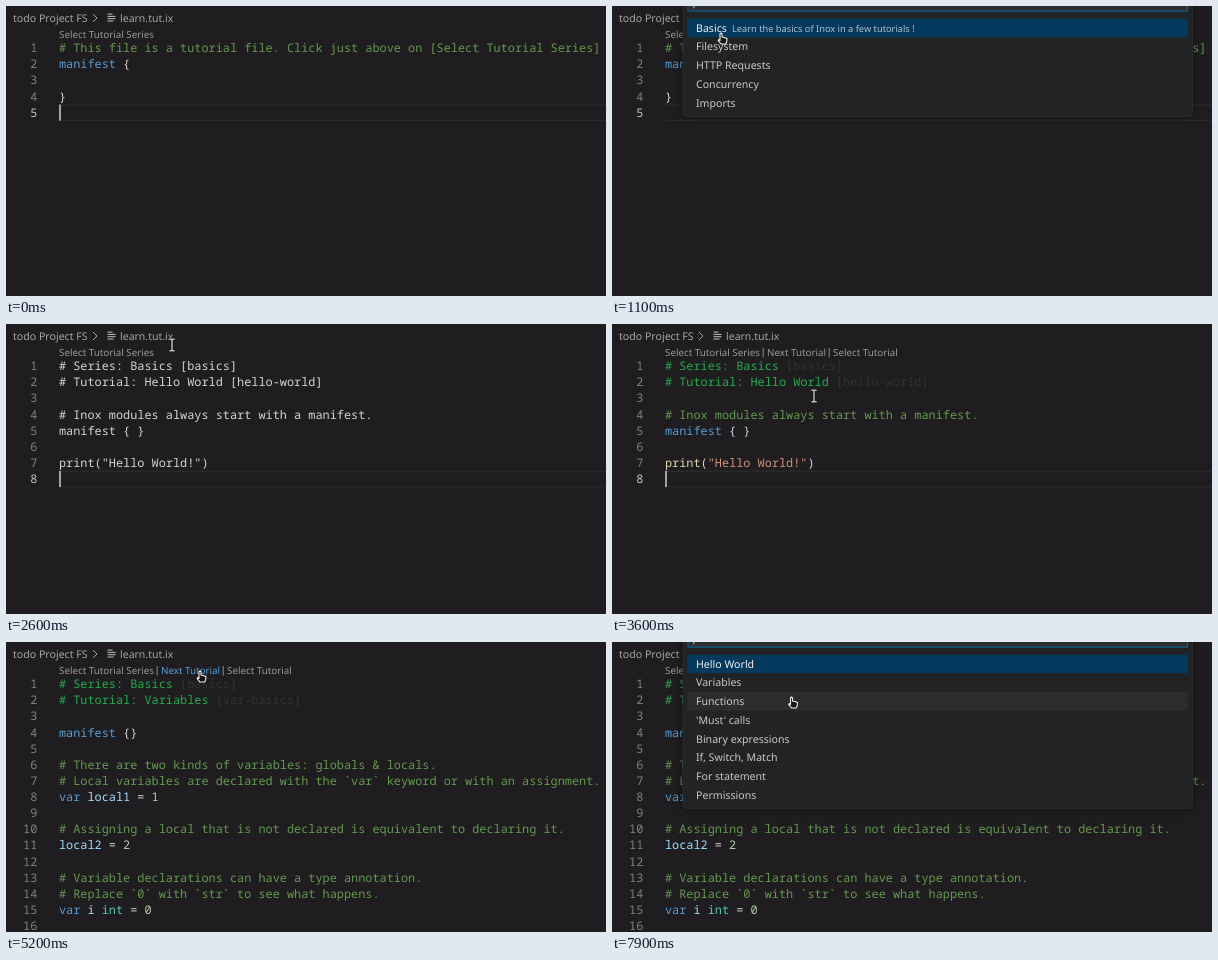
Recreate the animation shown at these times as an HTML page with a canvas. Size 600 px wide and 290 px high, loop 8 s.

```html
<!DOCTYPE html>
<html lang="en">
<head>
<meta charset="utf-8">
<title>Tutorial editor</title>
<style>
html, body { margin: 0; width: 100%; height: 100%; overflow: hidden; background: #1f1d1f; }
canvas { display: block; width: 600px; height: 290px; }
</style>
</head>
<body>
<canvas id="stage"></canvas>
<script>
const LOOP = 8000, STEP = 100;
const LEFT = 53, TOP = 34, LINE = 16.13, ROW = 18.7, ROWS_TOP = 12.6;
const CODE = "11.88px 'Noto Sans Mono', monospace";
const ui = size => `${size}px 'Noto Sans', sans-serif`;

const COLORS = {
  plain: '#d4d4d4', comment: '#629a4c', heading: '#1fae4c', faint: '#333234',
  keyword: '#569cd6', name: '#9cdcfe', type: '#4ec9b0', call: '#dcdcaa',
  string: '#ce9178', number: '#b5cea8'
};

const INTRO = [
  '# This file is a tutorial file. Click just above on [Select Tutorial Series]',
  'manifest {', '', '}', ''
];
const HELLO = [
  '# Series: Basics [basics]', '# Tutorial: Hello World [hello-world]', '',
  '# Inox modules always start with a manifest.', 'manifest { }', '',
  'print("Hello World!")', ''
];
const VARIABLES = [
  '# Series: Basics [basics]', '# Tutorial: Variables [var-basics]', '',
  'manifest {}', '',
  '# There are two kinds of variables: globals & locals.',
  '# Local variables are declared with the `var` keyword or with an assignment.',
  'var local1 = 1', '',
  '# Assigning a local that is not declared is equivalent to declaring it.',
  'local2 = 2', '',
  '# Variable declarations can have a type annotation.',
  '# Replace `0` with `str` to see what happens.',
  'var i int = 0', ''
];

// Highlighting arrives in passes: 0 plain, 1 grammar, 2 semantic.
const SCENES = [
  { from: 0, lines: INTRO, passes: [0, 0], active: 5 },
  { from: 2600, lines: HELLO, passes: [2700, 3000], active: 8 },
  { from: 4600, lines: VARIABLES, passes: [4700, 4900], active: 0 }
];

const PICKERS = [
  { from: 1000, to: 2500, blinkFrom: 1000, note: 'Learn the basics of Inox in a few tutorials !',
    items: ['Basics', 'Filesystem', 'HTTP Requests', 'Concurrency', 'Imports'] },
  { from: 6700, to: LOOP, blinkFrom: 6600,
    items: ['Hello World', 'Variables', 'Functions', "'Must' calls", 'Binary expressions',
      'If, Switch, Match', 'For statement', 'Permissions'] }
];

const LENSES = [
  { text: 'Select Tutorial Series', x: 53, end: 148 },
  { text: 'Next Tutorial', x: 155, end: 214 },
  { text: 'Select Tutorial', x: 221, end: 286 }
];

// time, x, y of the pointer's hot spot
const POINTER = [
  [100, 300, 220], [900, 109, 27], [1600, 109, 27], [2100, 178, 22], [2300, 179, 21],
  [2600, 166, 21], [3200, 205, 84], [3600, 202, 72], [4200, 202, 56], [4400, 194, 29],
  [5200, 194, 29], [5800, 255, 140], [6500, 253, 28], [7200, 253, 28], [7700, 179.5, 55]
];

const canvas = document.getElementById('stage');
const ctx = canvas.getContext('2d');
const ratio = window.devicePixelRatio || 1;
canvas.width = 600 * ratio;
canvas.height = 290 * ratio;
ctx.scale(ratio, ratio);
ctx.textRendering = 'geometricPrecision';

function text(str, x, y, color, font, align = 'left') {
  ctx.font = font;
  ctx.fillStyle = color;
  ctx.textAlign = align;
  ctx.fillText(str, x, y);
}

function rect(x, y, w, h, color) {
  ctx.fillStyle = color;
  ctx.fillRect(x, y, w, h);
}

function stroke(points, color, width) {
  ctx.beginPath();
  points.forEach(([x, y]) => ctx.lineTo(x, y));
  ctx.strokeStyle = color;
  ctx.lineWidth = width;
  ctx.stroke();
}

const blink = (t, from, period) => Math.floor((t - from) / period) % 2 === 0;

function pointerAt(t) {
  if (t < POINTER[0][0]) return null;
  const next = POINTER.findIndex(k => k[0] > t);
  if (next < 0) return POINTER[POINTER.length - 1].slice(1);
  const [t0, x0, y0] = POINTER[next - 1], [t1, x1, y1] = POINTER[next];
  const p = (t - t0) / (t1 - t0), e = p * p * (3 - 2 * p);
  return [x0 + (x1 - x0) * e, y0 + (y1 - y0) * e];
}

function tokenize(line, pass) {
  if (!pass) return [['plain', line]];
  if (line.startsWith('#')) {
    const cut = line.indexOf('[');
    if (pass < 2 || !/^# (Series|Tutorial):/.test(line)) return [['comment', line]];
    return [['heading', line.slice(0, cut)], ['faint', line.slice(cut)]];
  }
  return (line.match(/"[^"]*"|\w+|[^\w"]+/g) || []).map(word => {
    let kind = 'plain';
    if (word[0] === '"') kind = 'string';
    else if (/^(manifest|var)$/.test(word)) kind = 'keyword';
    else if (/^\d/.test(word)) kind = 'number';
    else if (pass > 1 && /^\w/.test(word)) {
      kind = word === 'int' ? 'type' : word === 'print' ? 'call' : 'name';
    }
    return [kind, word];
  });
}

function drawHeader() {
  text('todo Project FS', 7, 15.8, '#a5a5a5', ui(10.6));
  stroke([[87, 8], [91, 12], [87, 16]], '#a5a5a5', 1);
  [[8, 5], [10.3, 8], [12.6, 8], [14.9, 6]].forEach(([y, w]) => rect(101.5, y - 0.4, w, 1, '#c0c0c0'));
  text('learn.tut.ix', 114, 15.8, '#a5a5a5', ui(10.5));
}

function drawLenses(t, pointer, open) {
  const shown = t < 3400 ? 1 : 3;
  let hovered = false;
  LENSES.slice(0, shown).forEach(({ text: label, x, end }, i) => {
    const over = pointer && !open && pointer[0] >= x && pointer[0] <= end &&
      pointer[1] >= 24 && pointer[1] <= 35;
    hovered = hovered || over;
    text(label, x, 31.6, over ? '#4e9fdc' : '#999999', ui(9.8));
    if (i) rect(x - 4.3, 24, 0.9, 9.5, '#999999');
  });
  return hovered;
}

function drawCode(t, open) {
  const scene = SCENES.filter(s => t >= s.from).pop();
  const pass = scene.passes.filter(at => t >= at).length;
  ctx.font = CODE;
  const advance = ctx.measureText('0').width;
  if (scene.active) {
    const y = TOP + (scene.active - 1) * LINE;
    rect(LEFT, y - 0.3, 547, 1.4, '#2a292a');
    rect(LEFT, y + LINE - 1, 547, 1.4, '#2a292a');
    if (!open && blink(t, scene.from, 500)) rect(LEFT + 0.2, y, 1.6, LINE, '#c4c4c2');
  }
  scene.lines.forEach((line, i) => {
    const y = TOP + i * LINE + 12.15;
    text(i + 1, 31.3, y, i + 1 === scene.active ? '#c6c6c6' : '#808080', CODE, 'right');
    let x = LEFT;
    tokenize(line, pass).forEach(([kind, word]) => {
      text(word, x, y, COLORS[kind], CODE);
      x += word.length * advance;
    });
  });
}

function drawPicker(picker, t, pointer) {
  const bottom = ROWS_TOP + picker.items.length * ROW + 4.4;
  ctx.save();
  ctx.shadowColor = 'rgba(0,0,0,.55)';
  ctx.shadowBlur = 8 * ratio;
  ctx.beginPath();
  ctx.roundRect(71, -10, 509.5, bottom + 10, 4);
  ctx.fillStyle = '#222324';
  ctx.fill();
  ctx.restore();
  ctx.strokeStyle = '#2e2f30';
  ctx.lineWidth = 0.8;
  ctx.stroke();
  rect(75.5, -2, 500.5, 7.6, '#0a69ad');
  rect(76.4, -2, 498.7, 6.7, '#2e2f30');
  if (blink(t, picker.blinkFrom, 650)) rect(81.3, 0, 1, 2.2, '#c0c0c0');

  const over = Math.floor((pointer[1] - ROWS_TOP) / ROW);
  picker.items.forEach((item, i) => {
    const y = ROWS_TOP + i * ROW;
    if (i === 0 || i === over) rect(75.3, y, 500.4, ROW, i ? '#2a2c2d' : '#04395e');
    text(item, 84, y + 13.15, i ? '#c8c8c8' : '#f0f0f0', ui(10.6));
  });
  if (picker.note) text(picker.note, 120, ROWS_TOP + 13.15, '#adc0ce', ui(9.25));
}

function drawHand(x, y) {
  ctx.save();
  ctx.translate(x, y);
  ctx.beginPath();
  [[-1, 0.8], [0, 0], [1, 0.8], [1, 4], [5, 5], [6, 6], [5.6, 9], [4.6, 11],
    [0, 11], [-2.8, 7.6], [-2.4, 6.6], [-1, 7.4]].forEach(p => ctx.lineTo(...p));
  ctx.closePath();
  ctx.fillStyle = '#151515';
  ctx.fill();
  ctx.strokeStyle = '#eeeeee';
  ctx.lineWidth = 1.1;
  ctx.lineJoin = 'round';
  ctx.stroke();
  ctx.restore();
}

function drawBeam(x, y) {
  [['#111111', 2.8], ['#e6e6e6', 1.2]].forEach(([color, width]) => {
    stroke([[x, y - 5.5], [x, y + 5.5]], color, width);
    [-5.8, 5.8].forEach(dy => stroke([[x - 2.6, y + dy], [x + 2.6, y + dy]], color, width));
  });
}

function draw(now) {
  const t = Math.floor((now % LOOP) / STEP) * STEP;
  const pointer = pointerAt(t);
  const picker = PICKERS.find(p => t >= p.from && t < p.to);
  rect(0, 0, 600, 290, '#1f1d1f');
  drawHeader();
  const onLens = drawLenses(t, pointer, !!picker);
  drawCode(t, !!picker);
  if (picker) drawPicker(picker, t, pointer);
  if (pointer) (picker || onLens ? drawHand : drawBeam)(...pointer);
}

let start;
function tick(now) {
  if (start === undefined) start = now;
  draw(now - start);
  requestAnimationFrame(tick);
}
draw(0);
requestAnimationFrame(tick);
</script>
</body>
</html>
```
